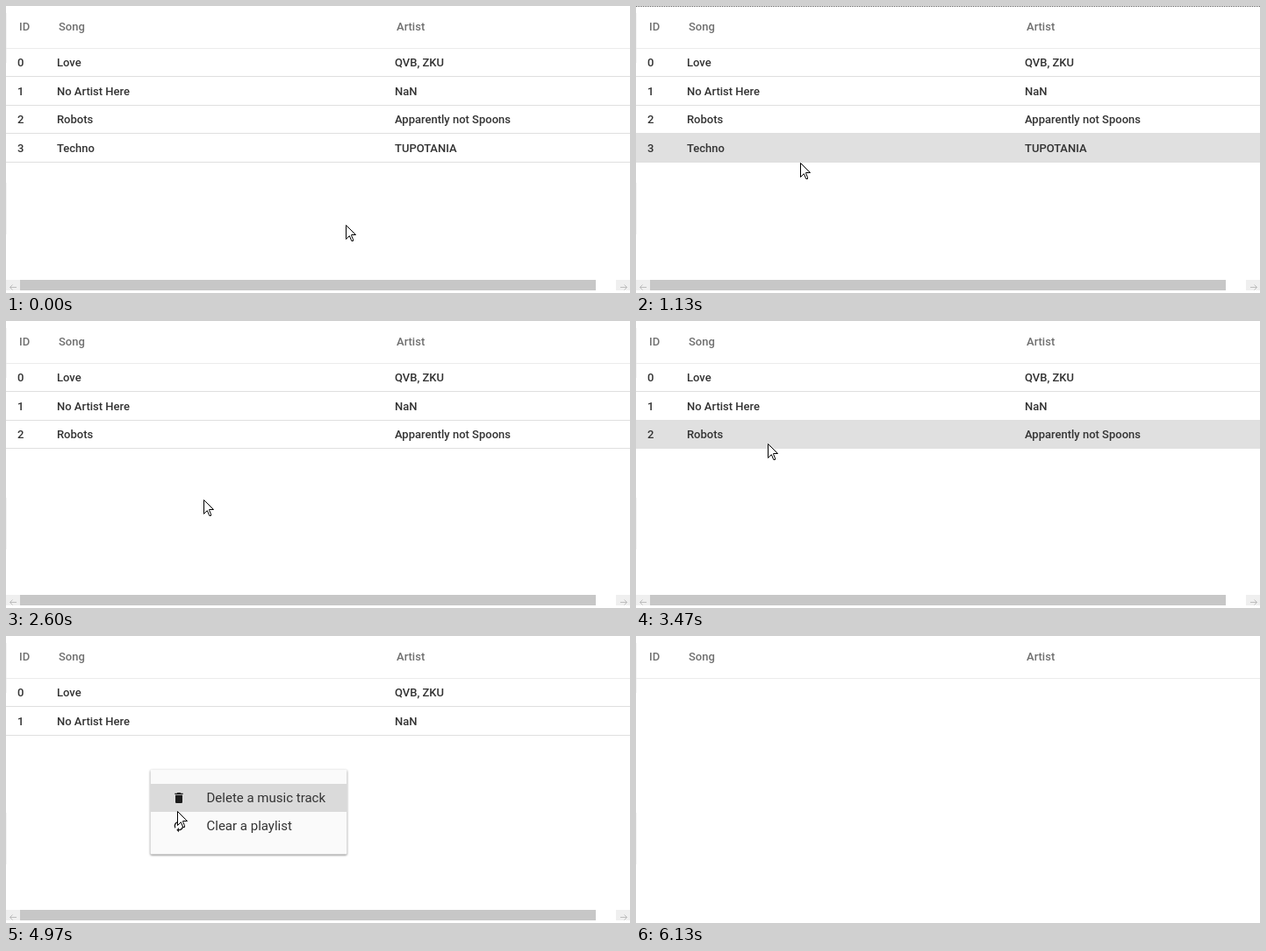
Recreate the animation shown at these times as an HTML page. Size 711 by 328 pixels, loop 6.81 s.

```html
<!DOCTYPE html>
<html lang="en">
<head>
<meta charset="utf-8">
<title>Playlist table</title>
<style>
  html, body { margin: 0; width: 100%; height: 100%; overflow: hidden; background: #fff; }
  svg { display: block; width: 711px; height: 328px; }
  text { font: 500 13px Roboto, Arial, sans-serif; fill: #333; white-space: pre; }
  .head text { fill: #707070; }
  #menu text { font-weight: 400; font-size: 15px; fill: #333; }
  #menu path { fill: #1c1c1c; }
  .panel { fill: #fafafa; filter: drop-shadow(0 1px 1.2px rgba(0, 0, 0, .5)); }
  .arrow { fill: none; stroke: #bdbdbd; }
</style>
</head>
<body>
<svg viewBox="0 0 711 328">
  <path d="M.5 8V65M.5 202V261" stroke="#f5f5f5"/>
  <g class="head">
    <text x="15" y="28">ID</text>
    <text x="60" y="28">Song</text>
    <text x="445" y="28">Artist</text>
    <rect y="48" width="711" height="1" fill="#ebebeb"/>
  </g>
  <g id="rows"></g>
  <path id="dots" d="M0 .5H711" stroke="#555" stroke-dasharray="1 1"/>
  <g id="bar">
    <path d="M0 313H16V325H0ZM695 313H711V325H695Z" fill="#efefef"/>
    <rect x="16" y="313" width="656" height="12" fill="#c7c7c7"/>
    <path class="arrow" d="M12 321.5H4.5M7.5 318.5L4.5 321.5L7.5 324.5"/>
    <path class="arrow" d="M700 321.5H707.5M704.5 318.5L707.5 321.5L704.5 324.5"/>
  </g>
  <g id="menu">
    <rect class="panel" width="224" height="97" rx="1.5"/>
    <rect id="pick" width="224" height="32" fill="#dadada"/>
    <path transform="translate(24.5 24.5) scale(.6667)" d="M6 19c0 1.1.9 2 2 2h8c1.1 0 2-.9 2-2V7H6zM19 4h-3.5l-1-1h-5l-1 1H5v2h14z"/>
    <path transform="translate(24.5 56.5) scale(.6667)" d="M12 6v3l4-4-4-4v3c-4.42 0-8 3.58-8 8 0 1.57.46 3.03 1.24 4.26L6.7 14.8c-.45-.83-.7-1.79-.7-2.8 0-3.31 2.69-6 6-6zm6.76 1.74L17.3 9.2c.44.84.7 1.79.7 2.8 0 3.31-2.69 6-6 6v-3l-4 4 4 4v-3c4.42 0 8-3.58 8-8 0-1.57-.46-3.03-1.24-4.26z"/>
    <text x="64" y="37.5">Delete a music track</text>
    <text x="64" y="69.5">Clear a playlist</text>
  </g>
  <path id="cursor" d="M.5 .5V16.5L4.3 12.7L6.8 18.5H8.5V16.8L6.6 12.2V11.5H11.5Z" fill="#fff" stroke="#000"/>
</svg>
<script>
const LOOP = 6810;
const $ = id => document.getElementById(id);
const show = (el, on) => { el.style.display = on ? '' : 'none'; };

const TRACKS = [
  ['Love', 'QVB, ZKU'],
  ['No Artist Here', 'NaN'],
  ['Robots', 'Apparently not Spoons'],
  ['Techno', 'TUPOTANIA']
];

// Each menu opens at the pointer; closing it removes tracks.
const MENUS = [
  { open: 1530, close: 2530, left: 3 },
  { open: 3670, close: 4270, left: 2 },
  { open: 4800, close: 5370, left: 0 }
];

// Pointer moves: start, end, x, y, ease-out power
const MOVES = [
  [30, 190, 374, 265], [190, 1130, 187, 179], [1130, 1400, 179, 172],
  [1700, 2330, 225, 204], [2700, 3200, 153, 151], [3230, 3470, 150, 140],
  [3670, 4130, 187, 171], [4270, 4630, 163, 152],
  [4800, 5200, 202, 211, 3], [5370, 6130, 84, 332]
];

function pointer(t) {
  let x = 387, y = 250;
  for (const [from, to, x1, y1, power = 1] of MOVES) {
    if (t < from) break;
    const k = 1 - (1 - Math.min(1, (t - from) / (to - from))) ** power;
    x += (x1 - x) * k;
    y += (y1 - y) * k;
  }
  return [Math.round(x), Math.round(y)];
}

// Bottom line of row i; the header is row -1.
const lineY = i => Math.floor(48 + 32.6 * (i + 1));

const rows = TRACKS.map(([song, artist], i) => {
  const g = document.createElementNS('http://www.w3.org/2000/svg', 'g');
  const line = lineY(i), top = lineY(i - 1);
  const label = (x, text) => `<text x="${x}" y="${line - 11}">${text}</text>`;
  g.innerHTML =
    `<rect y="${line}" width="711" height="1" fill="#dfdfdf"/>` +
    `<rect class="hover" y="${top}" width="711" height="${line + 1 - top}" fill="#e0e0e0"/>` +
    label(13, i) + label(58, song) + label(443, artist);
  $('rows').append(g);
  return g;
});

function draw(t) {
  const menu = MENUS.find(m => t >= m.open && t < m.close);
  const count = MENUS.reduce((n, m) => t >= m.close ? m.left : n, TRACKS.length);
  const tip = pointer(t);
  const anchor = menu ? pointer(menu.open) : tip;

  rows.forEach((g, i) => {
    const y = anchor[1] - 1;
    show(g, i < count);
    show(g.querySelector('.hover'), y > lineY(i - 1) && y <= lineY(i));
  });
  show($('dots'), t >= 30 && t < 1370);
  show($('bar'), count);

  show($('menu'), menu);
  if (menu) {
    const x = anchor[0] + 1.5, y = anchor[1] + .5;
    const item = Math.floor((tip[1] - y - 18.5) / 32);
    $('menu').setAttribute('transform', `translate(${x} ${y})`);
    show($('pick'), item >= 0);
    $('pick').setAttribute('y', 16.5 + 32 * item);
  }
  $('cursor').setAttribute('transform', `translate(${tip})`);
}

const start = performance.now();
function tick() {
  draw((performance.now() - start) % LOOP);
  requestAnimationFrame(tick);
}
tick();
</script>
</body>
</html>
```
